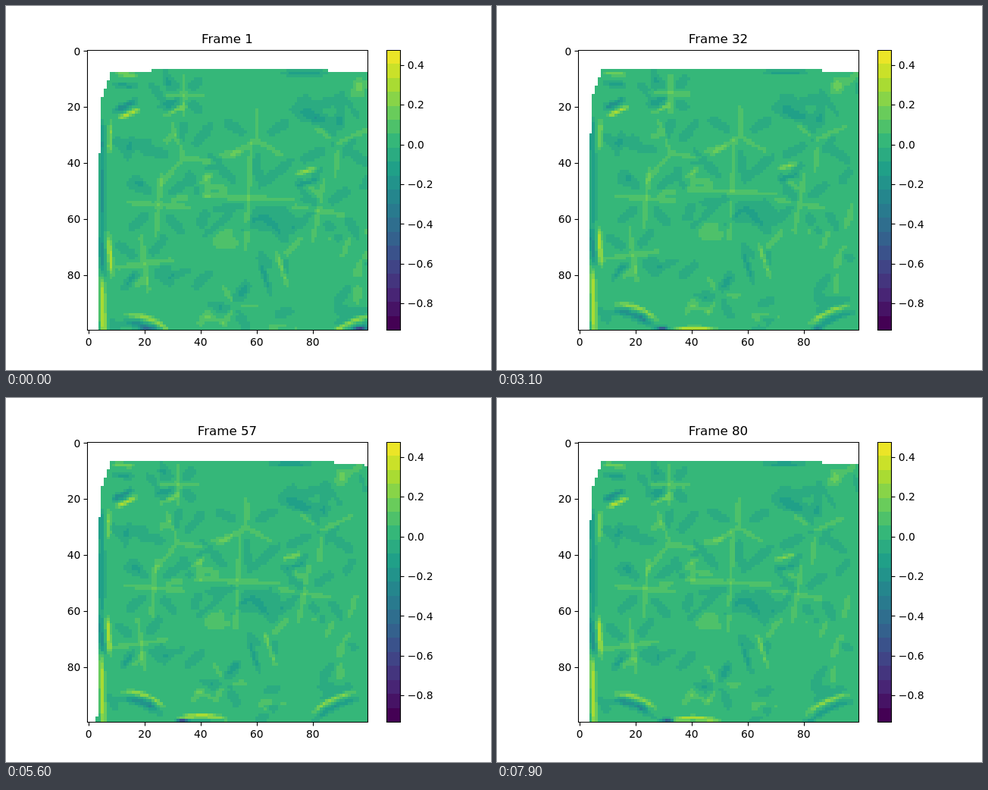
An HTML page with a canvas that plays this animation: 640x480 px, repeating every 8000 ms.

```html
<!DOCTYPE html>
<html lang="en">
<head>
<meta charset="utf-8">
<title>Heatmap</title>
<style>
  html, body { margin: 0; width: 100%; height: 100%; overflow: hidden; background: #fff; }
  canvas, svg { position: absolute; left: 0; top: 0; width: 640px; height: 480px; }
  text { font: 13.89px "DejaVu Sans", sans-serif; fill: #000; }
  #title { font-size: 16.67px; }
  .line { fill: none; stroke: #000; stroke-width: 1.11; }
</style>
</head>
<body>
<canvas id="map" width="640" height="480"></canvas>
<svg id="axes" viewBox="0 0 640 480">
  <text id="title" x="292" y="49.2" text-anchor="middle">Frame 1</text>
</svg>
<script>
const LEFT = 107.2, TOP = 57.6, CELL = 3.696, SIZE = 100, LEVELS = 20;
const ctx = document.getElementById('map').getContext('2d');
const svg = document.getElementById('axes');
const title = document.getElementById('title');
const snap = v => Math.floor(v + 0.5) + 0.5;

// Viridis, cut into even bands
const STOPS = ['440154', '482878', '3e4989', '31688e', '26828e',
               '1f9e89', '35b779', '6ece58', 'b5de2b', 'fde725']
  .map(h => [0, 2, 4].map(i => parseInt(h.slice(i, i + 2), 16)));

function viridis(u) {
  const p = u * 9, i = Math.min(8, Math.floor(p));
  const rgb = STOPS[i].map((c, k) => Math.round(c + (STOPS[i + 1][k] - c) * (p - i)));
  return `rgb(${rgb})`;
}
const COLORS = Array.from({ length: LEVELS }, (_, k) => viridis(k / 19.55));

// Axes, ticks and labels
function node(tag, attrs, text = '') {
  const el = document.createElementNS('http://www.w3.org/2000/svg', tag);
  for (const key in attrs) el.setAttribute(key, attrs[key]);
  el.textContent = text;
  svg.append(el);
}
const line = d => node('path', { d, class: 'line' });

line('M107.5 58.5H477.5V427.5H107.5Z');
line('M502.5 58.5H520.5V427.5H502.5Z');
for (let n = 0; n < 100; n += 20) {
  const x = LEFT + (n + 0.5) * CELL, y = TOP + (n + 0.5) * CELL;
  line(`M${snap(x)} 427.5v5`);
  node('text', { x, y: 447.7, 'text-anchor': 'middle' }, n);
  line(`M107.5 ${snap(y)}h-5`);
  node('text', { x: 98.4, y: y + 5.1, 'text-anchor': 'end' }, n);
}
for (let n = 4; n >= -8; n -= 2) {
  const y = 182.65 - n * 26.2;
  line(`M520.5 ${snap(y)}h5`);
  node('text', { x: 529.8, y: y + 5.1 }, (n < 0 ? '\u2212' : '') + (Math.abs(n) / 10).toFixed(1));
}

// The field is a sum of soft strokes, measured in colour bands
const strokes = [];
function stroke(x, y, degrees, half, width, amp, bend = 0) {
  const a = degrees * Math.PI / 180;
  strokes.push({ x, y, half, width, amp, bend, ux: Math.cos(a), uy: Math.sin(a) });
}

// A bright ridge with a dark valley beside it
function pleat(x, y, degrees, half, amp, gap, bend) {
  const a = degrees * Math.PI / 180;
  stroke(x, y, degrees, half, 0.9, amp, bend);
  stroke(x - gap * Math.sin(a), y + gap * Math.cos(a), degrees, half, 1, -0.65 * amp, bend);
}

// Ridges leaving one point, with valleys between them
function star(x, y, rays, turn, length) {
  for (let k = 0; k < 2 * rays; k++) {
    const ridge = k % 2 === 0, degrees = turn + k * 180 / rays;
    const a = degrees * Math.PI / 180, r = length * (ridge ? 0.5 : 0.75);
    stroke(x + r * Math.cos(a), y + r * Math.sin(a), degrees,
      length * (ridge ? 0.5 : 0.35), ridge ? 1 : 1.5, ridge ? 1.5 : -1.2);
  }
}

star(57, 52.5, 4, 3, 19);
star(82, 57, 4, 10, 12);
star(25, 55, 4, -85, 12);
star(34, 38, 3, 10, 14);
star(60, 32, 3, 30, 12);
star(52, 91, 3, 0, 9);
star(89, 33, 3, -25, 13);
star(20, 76, 4, -8, 11);
star(34, 16, 4, 0, 8);

pleat(13.5, 8.5, 5, 4, 2.5, 4);
pleat(7.7, 31, 92, 5.5, 3, 3);
pleat(7.7, 73, 86, 7, 4.5, 2.8);
pleat(14.5, 22.5, -25, 4, 4.5, -3.2);
pleat(30.5, 21.5, -25, 4, 2.4, -3.4);
pleat(77.5, 43, -15, 3.8, 2.8, 4);
pleat(69, 78, 72, 6.5, 2.6, 6.5);
pleat(21.5, 95.5, 20, 8, 3.6, 3, 1.5);
pleat(93, 97, -25, 8, 3.6, 3, 1);
pleat(43, 103.3, 0, 9, 4.5, 3, 1);

// broad patches and the left border
stroke(5, 50, 90, 16, 1, -2.4);
stroke(5.3, 94, 88, 14, 1, 4.6);
stroke(49, 67, 0, 6, 5, 1.1);
stroke(79, 22, 60, 6, 3, -1.2);
stroke(65, 60, 0, 8, 4, -0.9);
stroke(95.5, 85, 88, 7, 2.4, 1.1);
stroke(77, 8, 0, 7, 1, -2);

// faint wrinkles everywhere but in the smooth upper middle
let seed = 7;
const random = () => (seed = seed * 16807 % 2147483647) / 2147483647;
for (let k = 0; k < 70; k++) {
  const x = 9 + 96 * random(), y = 8 + 98 * random();
  const degrees = 180 * random(), half = 2.5 + 4 * random(), width = 0.9 + random();
  const amp = random() < 0.65 ? -0.9 : 1.1;
  if (Math.hypot(x - 58, y - 18) > 17) stroke(x, y, degrees, half, width, amp);
}

function field(x, y) {
  let sum = 0;
  for (const c of strokes) {
    const dx = x - c.x, dy = y - c.y;
    const along = (dx * c.ux + dy * c.uy) / c.half;
    if (along > 1.6 || along < -1.6) continue;
    const across = (dx * c.uy - dy * c.ux + c.bend * along * along) / c.width;
    if (across > 2.5 || across < -2.5) continue;
    sum += c.amp * Math.exp(-across * across - along ** 4);
  }
  return sum;
}

// Dark spots that slide along the bottom border
function spots(i, j, s) {
  const spot = (x, amp) => amp * Math.exp(-(((i - x) / 2) ** 2) - ((j - 99.3) / 0.8) ** 2);
  return spot(20 + 14 * s, -4 - 6 * s) + spot(97 - 18 * s, -8 * (1 - s));
}

// Squeeze over time: a slow swell with one dip
function squeeze(t) {
  return Math.sin(Math.PI * t / 11800) ** 1.25 - 0.48 * Math.exp(-(((t - 4600) / 600) ** 2));
}

// Filled columns [from, to) of a row
function span(row, s) {
  if (row < 7) return [0, 0];
  if (row === 7) return [Math.max(8, Math.round(23 - 22 * s)), 86 + Math.round(1.6 * s)];
  const lift = s > 0.35 ? 1 : 0;
  const stairs = Math.min(3, Math.floor((row - 8 + lift) / 3));
  const lower = (row >= Math.round(36.6 - 10 * s)) + (row >= Math.round(117.6 - 20 * s));
  return [8 - stairs - lower, row === 8 && s > 0.95 ? 99 : SIZE];
}

const colX = i => Math.ceil(106.5 + i * 3.7);
const rowY = j => Math.ceil(56.5 + j * 3.7);

function drawMap(s) {
  ctx.clearRect(107, 57, 370, 370);
  for (let j = 0; j < SIZE; j++) {
    const [from, to] = span(j, s);
    for (let i = from; i < to; i++) {
      const v = field(i / (1 - 0.065 * s), j / (1 - 0.06 * s)) + spots(i, j, s);
      const level = Math.max(0, Math.min(LEVELS - 1, Math.floor(13.3 + v)));
      ctx.fillStyle = COLORS[level];
      ctx.fillRect(colX(i), rowY(j), colX(i + 1) - colX(i), rowY(j + 1) - rowY(j));
    }
  }
}

COLORS.forEach((color, k) => {
  const y = Math.round(427.2 - (k + 1) * 18.48);
  ctx.fillStyle = color;
  ctx.fillRect(502, y, 18, Math.round(427.2 - k * 18.48) - y);
});

const start = performance.now();
let shown = -1;
function tick() {
  const n = Math.floor((performance.now() - start) % 8000 / 100);
  if (n !== shown) {
    shown = n;
    title.textContent = `Frame ${n + 1}`;
    drawMap(squeeze(n * 100));
  }
  requestAnimationFrame(tick);
}
tick();
</script>
</body>
</html>
```
